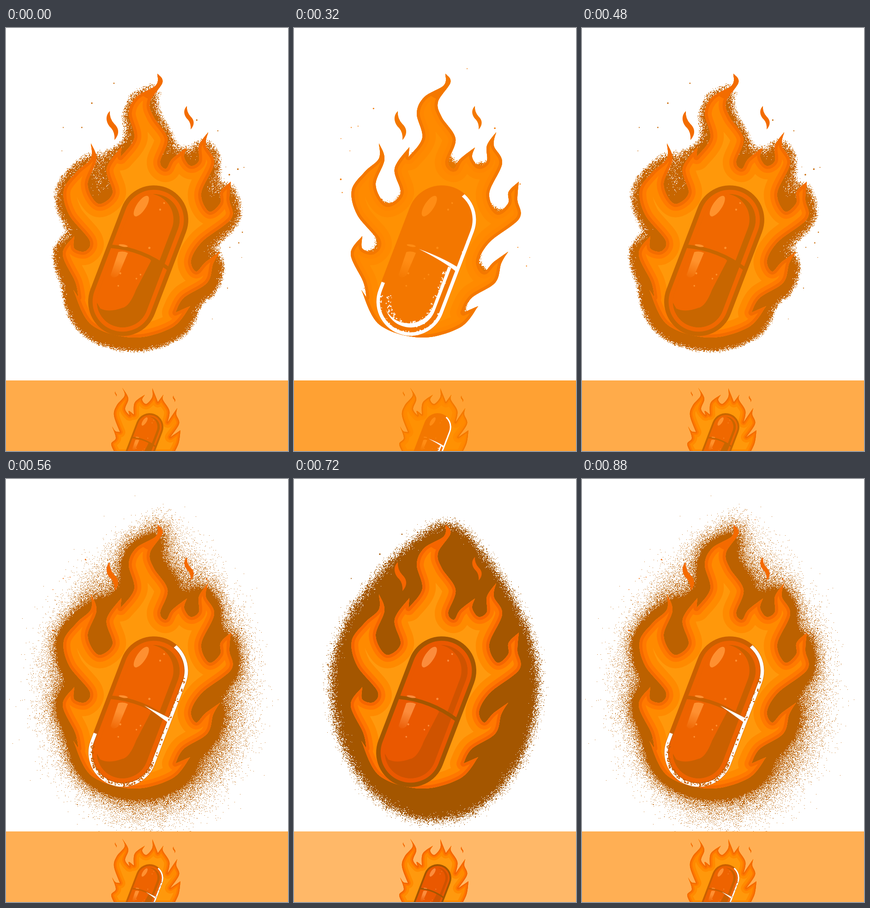
An HTML page with a canvas that plays this animation: 611x917 px, repeating every 0.96 s.

```html
<!DOCTYPE html>
<html lang="en">
<head>
<meta charset="utf-8">
<title>Burning capsule</title>
<style>
html, body { margin: 0; width: 100%; height: 100%; overflow: hidden; background: #fff; }
canvas { display: block; }
</style>
</head>
<body>
<canvas id="stage" width="611" height="917"></canvas>
<script>
const W = 611, H = 917, FLOOR = 764, STEP = 80, STEPS = 12;
const clamp = v => Math.max(0, Math.min(1, v));

function randomizer(seed) {
  return () => {
    seed = seed + 0x6D2B79F5 | 0;
    let t = Math.imul(seed ^ seed >>> 15, 1 | seed);
    t = t + Math.imul(t ^ t >>> 7, 61 | t) ^ t;
    return ((t ^ t >>> 14) >>> 0) / 4294967296;
  };
}

// Smooth curve through key points; "/" marks a sharp corner.
function spline(text) {
  const path = new Path2D();
  let corner = null;
  for (const part of text.split('/')) {
    const pts = part.trim().split(/\s+/).map(p => p.split(',').map(Number));
    if (corner) pts.unshift(corner);
    else path.moveTo(...pts[0]);
    for (let i = 0; i < pts.length - 1; i++) {
      const b = pts[i], c = pts[i + 1], a = pts[i - 1] || b, d = pts[i + 2] || c;
      path.bezierCurveTo(b[0] + (c[0] - a[0]) / 6, b[1] + (c[1] - a[1]) / 6,
        c[0] - (d[0] - b[0]) / 6, c[1] - (d[1] - b[1]) / 6, c[0], c[1]);
    }
    corner = pts[pts.length - 1];
  }
  path.closePath();
  return path;
}

// Tips, bulges and coves, clockwise from the top.
const flame = spline(`328,99 339,118 312,160 320,193 350,240 334,290 347,305 360,284 392,259 / 386,280 400,299
  418,288 418,255 438,226 / 433,255 451,293 423,358 440,398 464,380 465,355 487,333 / 484,372 488,413 425,463
  401,503 412,528 432,508 464,485 / 449,510 436,552 385,585 367,617 / 399,603 / 360,649 275,671 185,643
  146,568 / 157,584 / 150,550 123,490 148,451 / 148,478 172,484 181,460 137,405 125,352 153,312 184,283
  184,250 / 196,285 177,340 200,381 231,358 218,305 250,258 / 248,280 / 278,238 266,185 282,150 325,124 328,99`);
const smallFlame = spline(`238,925 228,902 238,889 230,864 / 237,874 247,876 / 234,840 240,818 257,797 252,780 /
  265,803 258,826 268,840 / 266,830 277,838 / 279,812 301,795 / 295,806 304,815 317,800 317,781 / 326,803 329,811 /
  341,795 / 340,806 354,830 350,855 / 360,840 371,824 / 369,838 375,858 356,887 / 378,872 / 374,900 362,925`);
const ember = 'M0 0C-.2 .2-.1 .45 .04 .58Q.18 .74 .16 1C.34 .8 .32 .6 .16 .45Q-.02 .26 0 0Z';
const tilt = Math.atan2(68, 178);

function egg() {
  const p = new Path2D();
  for (let a = 0; a < 2 * Math.PI; a += 0.05) {
    const s = Math.sin(a), up = Math.min(0, s);
    p.lineTo(305 + 225 * Math.cos(a) * (1 - 0.45 * up * up) - 26 * up * up * up, 440 + (s > 0 ? 302 : 345) * s);
  }
  return p;
}

// Palettes for the saturated, middle and pale moods; flame runs from rim to core.
const keyMoods = [
  { bg: '#ff9c28', rim: '#f47e00', outer: '#ff8c00', inner: '#ff8a00', core: '#ff8d00', body: '#f47e00', shade: '#f47e00', shine: '#ff8908', glow: '#f47e00' },
  { bg: '#ffab4a', rim: '#f36c00', outer: '#ff7a00', inner: '#ff8a00', core: '#ff980a', body: '#f06800', shade: '#c86600', shine: '#ff922c', glow: '#c86600' },
  { bg: '#ffb868', rim: '#f56500', outer: '#ff7700', inner: '#ff8a00', core: '#ff990e', body: '#ea5800', shade: '#cf5300', shine: '#fb8c3c', glow: '#a45600' }
];
const channels = hex => [1, 3, 5].map(k => parseInt(hex.slice(k, k + 2), 16));

function moodAt(level) {
  const k = level < 3 ? 0 : 1, t = level / 3 - k, mood = {};
  for (const name in keyMoods[k]) {
    const to = channels(keyMoods[k + 1][name]);
    const rgb = channels(keyMoods[k][name]).map((v, i) => Math.round(v + (to[i] - v) * t));
    mood[name] = `rgb(${rgb})`;
    if (name === 'glow') mood.glowRgb = rgb;
  }
  if (level < 3) mood.shade = mood.body;
  mood.hollow = level % 3 !== 0 || level === 0;
  mood.edge = mood.hollow ? mood.shade : mood.glow;
  return mood;
}

function layer() {
  const canvas = document.createElement('canvas');
  canvas.width = W;
  canvas.height = H;
  return canvas.getContext('2d', { willReadFrequently: true });
}

function blurred(path, radius) {
  const c = layer();
  c.filter = `blur(${radius}px)`;
  c.fill(path);
  const data = c.getImageData(0, 0, W, H).data;
  return Float32Array.from({ length: W * H }, (_, i) => data[i * 4 + 3] / 255);
}

const near = blurred(flame, 20), around = blurred(egg(), 12), far = blurred(egg(), 50);
const grain = Float32Array.from({ length: W * H }, randomizer(7));

// Whether a pixel of the speckled glow is lit.
function glows(level, x, y, i) {
  const fine = grain[i], down = y / FLOOR;
  const rough = (fine + grain[(y >> 1) * W + (x >> 1)]) / 2 - 0.5;
  if (level < 3) return near[i] + 0.16 * rough > 0.7 - 0.05 * level;
  if (level === 3) return near[i] * (1 + 1.4 * rough) > Math.max(0.055, 0.36 - 0.4 * down);
  if (level === 4) return fine < near[i] * 4 + far[i] ** 3 * (0.6 + 0.7 * down);
  if (level === 6) return around[i] + rough > 0.5;
  const reach = Math.hypot((x - 308) / 285, (y - 445) / 370);
  return rough + 0.5 < clamp((reach - 0.86) / 0.36) || near[i] + 0.35 * rough > 0.66 - 0.27 * down;
}

function drawGlow(c, level, rgb) {
  const image = c.getImageData(0, 0, W, FLOOR);
  for (let y = 0, i = 0; y < FLOOR; y++) {
    for (let x = 0; x < W; x++, i++) {
      if (glows(level, x, y, i)) image.data.set(rgb, i * 4);
    }
  }
  c.putImageData(image, 0, 0);
}

function ellipse(c, x, y, rx, ry = rx, turn = 0) {
  c.beginPath();
  c.ellipse(x, y, rx, ry, turn, 0, 7);
  c.fill();
}

function drawSparks(c, mood) {
  const random = randomizer(12);
  c.fillStyle = mood.hollow ? mood.rim : mood.glow;
  for (let i = 0; i < 34; i++) {
    const a = random() * 2 * Math.PI, reach = 0.85 + random() * 0.3;
    const x = 305 + 205 * reach * Math.cos(a), y = 390 + 275 * reach * Math.sin(a);
    if (!mood.hollow || i % 2) ellipse(c, x, y, 0.7 + random() * 1.2);
  }
}

function drawEmber(c, x, y, size) {
  c.save();
  c.translate(x, y);
  c.scale(size, size);
  c.fill(new Path2D(ember));
  c.restore();
}

function drawFlame(c, path, mood, scale) {
  c.save();
  c.clip(path);
  c.fillStyle = mood.core;
  c.fillRect(0, 0, W, H);
  c.lineJoin = 'round';
  for (const [tone, width] of [['inner', 58], ['outer', 30], ['rim', 13]]) {
    c.strokeStyle = mood[tone];
    c.lineWidth = width * scale;
    c.stroke(path);
  }
  if (scale === 1) {
    c.fillStyle = mood.rim;
    ellipse(c, 322, 116, 45, 40, 0.5);
  }
  c.restore();
}

function capsule(r, dx = 0, dy = 0) {
  const p = new Path2D();
  p.roundRect(dx - r, dy - 95 - r, 2 * r, 190 + 2 * r, r);
  return p;
}

function frame(outer, inner) {
  const p = new Path2D(outer);
  p.addPath(inner);
  return p;
}

// Blank outline on the lit side, with crumbling edges.
function drawHollow(c, level, mood) {
  const thin = level === 4;
  c.fillStyle = '#fff';
  c.save();
  c.clip(new Path2D('M-90 77H-60L3-120L30-172H120V190H-90Z'));
  c.fill(frame(capsule(74), capsule(66.5)), 'evenodd');
  c.restore();
  c.fill(new Path2D(thin ? 'M8-17Q45-14 69-11V-1Q40-9 8-17' : 'M-24-18Q30-19 69-11V-1Q35-12-24-18'));
  if (!thin) {
    c.save();
    c.clip(capsule(56));
    c.clip(new Path2D('M56-5H20L30 100L-60 112V190H80V-5Z'));
    c.fill(frame(capsule(80), capsule(56, -7, -7)), 'evenodd');
    c.restore();
  }
  const random = randomizer(31);
  for (let i = 0; i < 220; i++) {
    const inner = !thin && i < 150;
    const radius = inner ? 42 + 12 * random() : 63 + 8 * random();
    const a = random() * 4.3 - 1.2;
    const x = radius * Math.cos(Math.max(0, a));
    const y = 95 + (a < 0 ? a * (inner ? 75 : 170) : radius * Math.sin(a));
    c.fillStyle = thin ? mood.edge : '#fff';
    c.fillRect(x, y, 1 + random() * 2.5, 1 + random() * 2.5);
  }
}

function drawPill(c, level, mood) {
  const paint = (color, path) => { c.fillStyle = color; c.fill(path); };
  paint(mood.edge, capsule(74.6));
  paint(mood.body, capsule(65));
  c.save();
  c.clip(capsule(56));
  paint(mood.shade, capsule(56));
  paint(mood.body, new Path2D('M-66-12Q0-28 26-10L18 60Q18 100 4 108Q-18 128-40 126L-66 105Z'));
  c.clip(new Path2D('M-80-190H80V-7Q0-27-80-7Z'));
  paint(mood.body, capsule(56, -13, 4));
  c.restore();

  c.strokeStyle = mood.edge;
  c.lineWidth = 8;
  c.stroke(new Path2D('M-67-8Q0-27 68-7'));

  c.fillStyle = mood.shine;
  ellipse(c, -36, -113, 10, 26, 0.22);
  ellipse(c, -42, -19, 10, 2.5, -0.2);
  const random = randomizer(5);
  for (let i = 0; i < 7; i++) ellipse(c, random() * 80 - 45, random() * 230 - 140, 1.5 + random());
  const fade = c.createLinearGradient(0, 15, 0, 58);
  fade.addColorStop(0, mood.shine);
  fade.addColorStop(1, mood.body);
  paint(fade, new Path2D('M-47-2Q-38-9-27-8L-29 45Q-36 58-45 50Z'));
  if (mood.hollow) drawHollow(c, level, mood);
}

function drawFire(c, level, mood, path, x, y, scale) {
  drawFlame(c, path, mood, scale);
  c.save();
  c.translate(x, y);
  c.scale(scale, scale);
  c.rotate(tilt);
  drawPill(c, level, mood);
  c.restore();
}

function drawScene(level) {
  const c = layer(), mood = moodAt(level);
  c.fillStyle = '#fff';
  c.fillRect(0, 0, W, H);
  drawGlow(c, level, mood.glowRgb);
  drawSparks(c, mood);
  c.fillStyle = mood.rim;
  drawEmber(c, 225, 180, 63);
  drawEmber(c, 392, 169, 51);
  drawFire(c, level, mood, flame, 286.5, 504.5, 1);

  c.fillStyle = mood.bg;
  c.fillRect(0, FLOOR, W, H - FLOOR);
  c.fillStyle = mood.rim;
  drawEmber(c, 237, 788, 11);
  drawEmber(c, 363, 797, 14);
  drawFire(c, level, mood, smallFlame, 297.6, 900.4, 0.4);
  return c.canvas;
}

const scenes = Array.from({ length: 7 }, (_, level) => drawScene(level));
const stage = document.getElementById('stage').getContext('2d');
const start = performance.now();

function show() {
  const step = Math.floor(Math.max(0, performance.now() - start) / STEP) % STEPS;
  // The mood swings back and forth, most saturated at step 3.
  const level = Math.abs((step + 3) % STEPS - 6);
  stage.drawImage(scenes[level], 0, 0);
  requestAnimationFrame(show);
}
show();
</script>
</body>
</html>
```
